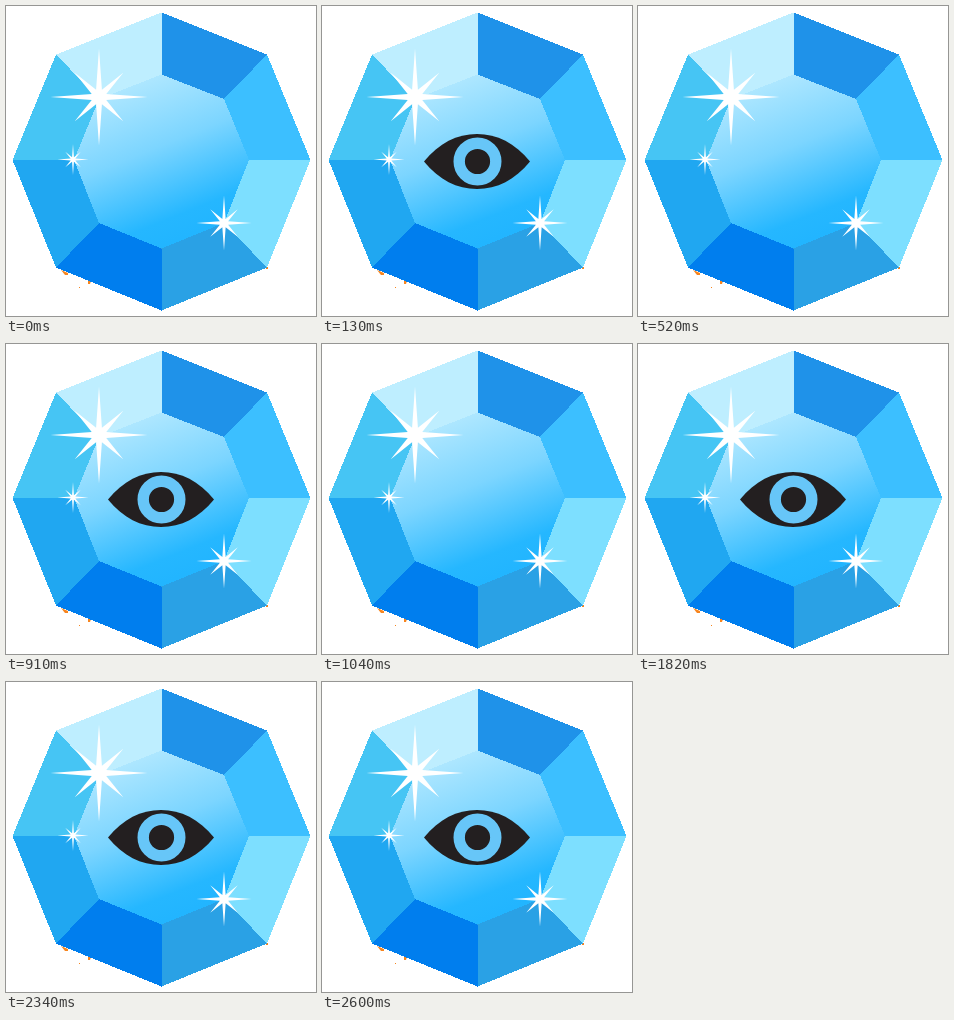
An HTML page that plays this animation: 310 by 310 pixels, repeating every 2.73 s.

```html
<!DOCTYPE html>
<html lang="en">
<head>
<meta charset="utf-8">
<title>Blinking gem</title>
<style>
  html, body { margin: 0; width: 100%; height: 100%; overflow: hidden; background: #fff; }
  svg { display: block; width: 100%; height: 100%; }

  /* 21 beats of 130 ms; the eye shows on beats 1, 3, 7, 14, 18 and 20 */
  .eye { animation: blink 2730ms step-end infinite; }
  @keyframes blink {
    0%, 9.523%, 19.047%, 38.095%, 71.428%, 90.476% { visibility: hidden; }
    4.761%, 14.285%, 33.333%, 66.666%, 85.714%, 95.238%, 100% { visibility: visible; }
  }
</style>
</head>
<body>
<svg viewBox="0 0 310 310">
  <defs>
    <linearGradient id="shine" gradientUnits="userSpaceOnUse" x1="121" y1="72" x2="184" y2="228">
      <stop offset="0" stop-color="#b4e9ff"/>
      <stop offset=".45" stop-color="#7cd5ff"/>
      <stop offset=".87" stop-color="#25b7ff"/>
      <stop offset="1" stop-color="#22b5ff"/>
    </linearGradient>
    <path id="star" fill="#fff" d="M0-1 L.06-.15 L.5-.5 L.15-.06 L1 0 L.15.06 L.5.5 L.06.15
      L0 1 L-.06.15 L-.5.5 L-.15.06 L-1 0 L-.15-.06 L-.5-.5 L-.06-.15Z"/>
  </defs>

  <!-- stray flecks under the rim -->
  <g fill="#f7851e">
    <path d="M55 264 L62 267 V269 L59 269Z"/>
    <path d="M82 275 H85 L84 278 H82Z"/>
    <rect x="73" y="281" width="1" height="1"/>
    <rect x="260" y="261" width="2" height="2"/>
  </g>

  <g shape-rendering="crispEdges">
    <path fill="#beeeff" d="M50 48.500 L155.500 6.500 V68.500 L93 93Z"/>
    <path fill="#1f92e9" d="M155.500 6.500 L261 48.500 L218 93 L155.500 68.500Z"/>
    <path fill="#3cbfff" d="M261 48.500 L304.500 154 H243 L218 93Z"/>
    <path fill="#7ddfff" d="M304.500 154 L261 261.500 L218 217 L243 154Z"/>
    <path fill="#2aa1e5" d="M261 261.500 L155.500 304.500 V242.500 L218 217Z"/>
    <path fill="#007eee" d="M155.500 304.500 L50 261.500 L93 217 L155.500 242.500Z"/>
    <path fill="#20a7f1" d="M50 261.500 L6.500 154 H68 L93 217Z"/>
    <path fill="#46c5f4" d="M6.500 154 L50 48.500 L93 93 L68 154Z"/>
    <path fill="url(#shine)" d="M155.500 68.500 L218 93 L243 154 L218 217 L155.500 242.500 L93 217 L68 154 L93 93Z"/>
  </g>

  <use href="#star" transform="translate(93 91) scale(48.500)"/>
  <use href="#star" transform="translate(67 153.500) scale(15.500)"/>
  <use href="#star" transform="translate(218 217) scale(27.500)"/>

  <g class="eye">
    <path fill="#231f20" d="M102 155.500 C117 137 135 128 155 128 S193 137 208 155.500 C193 174 175 183 155 183 S117 174 102 155.500Z"/>
    <circle cx="155.500" cy="155.500" r="18.300" fill="none" stroke="#67c6f8" stroke-width="11.400"/>
  </g>
</svg>
</body>
</html>
```
